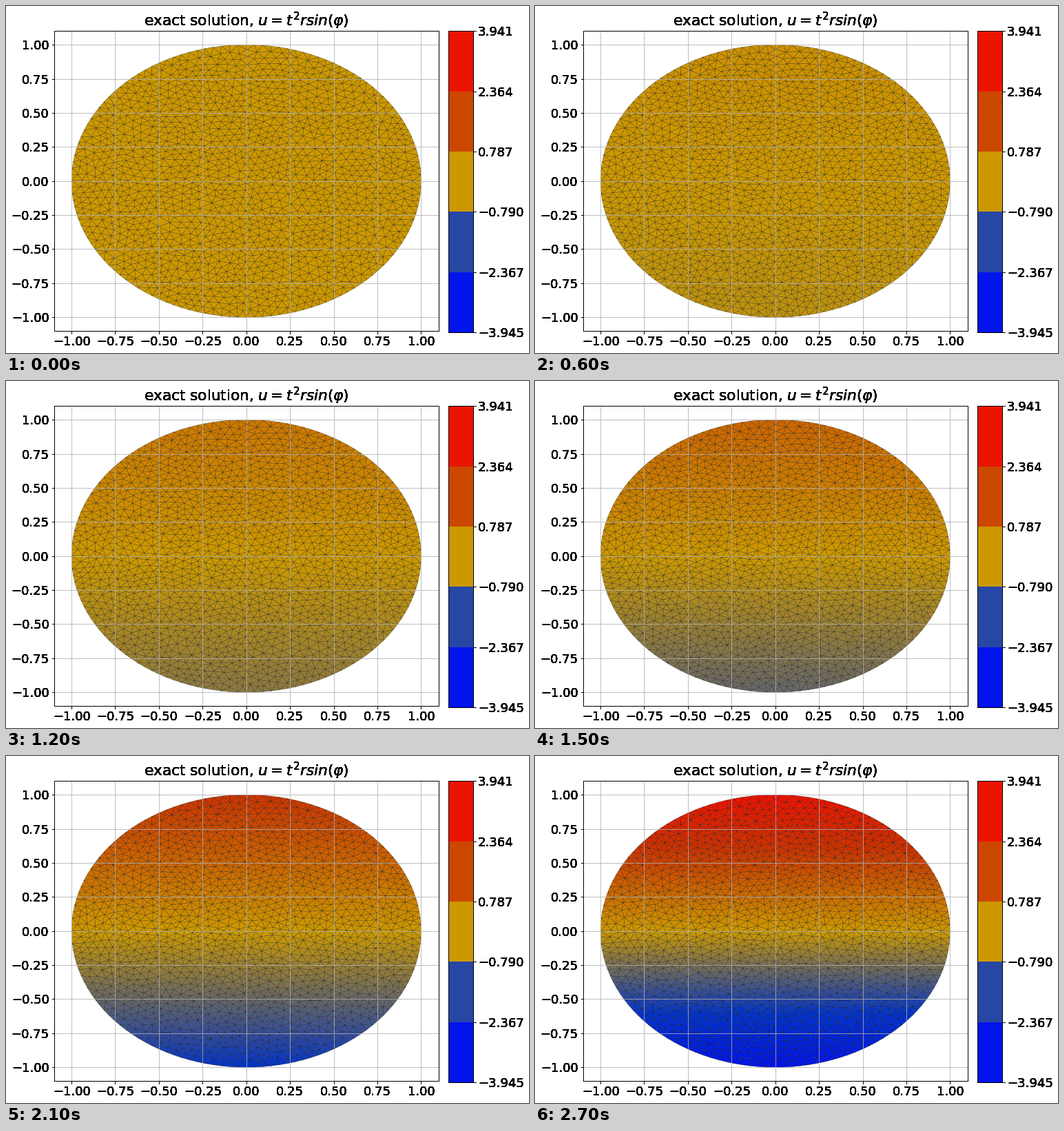
Recreate the animation shown at these times as a matplotlib script. Size 759 by 503 pixels, loop 3 s.

```python
import numpy as np
import matplotlib.pyplot as plt
from matplotlib.animation import FuncAnimation
from matplotlib.colors import LinearSegmentedColormap, Normalize
from matplotlib.tri import Triangulation

WIDTH, HEIGHT, DPI = 759, 503, 72
FRAMES, INTERVAL = 10, 300
TIME_STEP = 0.2
U_MIN, U_MAX = -3.9446, 3.9414
TITLE = r"exact solution, $u = t^2rsin(\varphi)$"

plt.rcParams.update({"font.family": "DejaVu Sans", "font.size": 18})
cmap = LinearSegmentedColormap.from_list(
    "heat", ["#0000ff", "#0033cc", "#cc9900", "#cc3300", "#ff0000"])
norm = Normalize(U_MIN, U_MAX)


def disk_mesh(spacing=0.037, rim_count=132, smoothing=2):
    """Unstructured triangulation of the unit disk."""
    rng = np.random.default_rng(4)
    angle = 2 * np.pi * np.arange(rim_count) / rim_count
    points = np.empty((4000, 2))
    points[:rim_count] = np.column_stack([np.cos(angle), np.sin(angle)])
    count = rim_count
    for candidate in rng.uniform(-1, 1, (30000, 2)):
        if np.hypot(*candidate) > 0.968:
            continue
        gap = points[:count] - candidate
        if (gap ** 2).sum(axis=1).min() > spacing ** 2:
            points[count] = candidate
            count += 1
    points = points[:count]
    for _ in range(smoothing):
        a, b = Triangulation(*points.T).edges.T
        total, degree = np.zeros_like(points), np.zeros(count)
        for here, there in ((a, b), (b, a)):
            np.add.at(total, here, points[there])
            np.add.at(degree, here, 1)
        mean = total / degree[:, None]
        points[rim_count:] = 0.5 * (points + mean)[rim_count:]
    return Triangulation(*points.T)


def add_axes(left, top, right, bottom):
    """Axes placed by pixel edges measured from the top left."""
    return fig.add_axes([left / WIDTH, 1 - bottom / HEIGHT,
                         (right - left) / WIDTH, (bottom - top) / HEIGHT])


def add_plot_axes():
    ax = add_axes(69.7, 36.4, 627.7, 471)
    ticks = np.linspace(-1, 1, 9)
    ax.set(xlim=(-1.1, 1.1), ylim=(-1.1, 1.1), xticks=ticks, yticks=ticks)
    ax.set_title(TITLE)
    return ax


def add_bar_axes():
    ax = add_axes(642.1, 36.4, 678.1, 473)
    ax.set(xlim=(0, 1), ylim=(U_MIN, U_MAX), xticks=[])
    ax.yaxis.tick_right()
    ax.set_yticks(levels, [f"{v:.3f}".replace("-", "\u2212") for v in levels])
    return ax


fig = plt.figure(figsize=((WIDTH + 0.001) / DPI, (HEIGHT + 0.001) / DPI),
                 dpi=DPI, facecolor="white")
levels = np.linspace(U_MIN, U_MAX, 6)

plot_ax = add_plot_axes()
mesh = disk_mesh()
heights = mesh.y[mesh.triangles].mean(axis=1)
surface = plot_ax.tripcolor(mesh, facecolors=0 * heights, cmap=cmap, norm=norm,
                            edgecolors="k", linewidth=0.25)
plot_ax.set(xlim=(-1.1, 1.1), ylim=(-1.1, 1.1))
plot_ax.grid(True)  # tripcolor switches the grid off

bar_ax = add_bar_axes()
middles = (levels[:-1] + levels[1:]) / 2
bar_ax.pcolormesh([0, 1], levels, middles[:, None], cmap=cmap, norm=norm)

# Overlaid copies give the lettering its heavy, hard edges.
for add_copy in (add_plot_axes, add_bar_axes):
    for _ in range(7):
        add_copy().patch.set_visible(False)


def update(frame):
    t = TIME_STEP * frame
    surface.set_array(t ** 2 * heights)
    return [surface]


animation = FuncAnimation(fig, update, frames=FRAMES, interval=INTERVAL,
                          init_func=lambda: update(0), repeat=True,
                          repeat_delay=0, blit=False)
plt.show()
```
